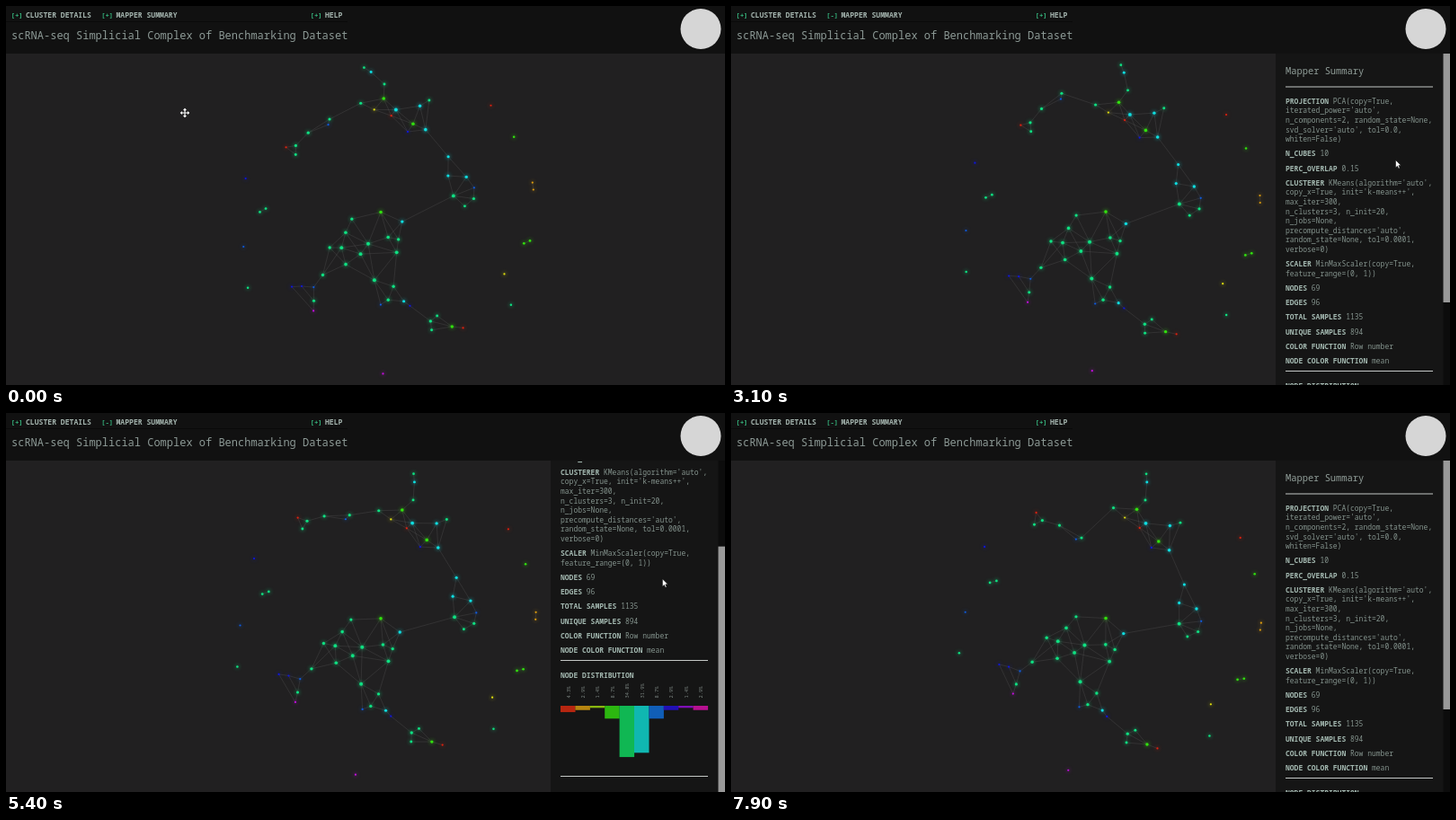
An HTML page for the animation above (8000 ms loop, 800 by 422 pixels).

```html
<!DOCTYPE html>
<html lang="en">
<head>
<meta charset="utf-8">
<title>Simplicial complex viewer</title>
<style>
  html, body { margin: 0; width: 100%; height: 100%; overflow: hidden; background: #212021; }
  svg { display: block; width: 100vw; height: 100vh; }
  text { font-family: 'Noto Sans Mono', 'DejaVu Sans Mono', monospace; white-space: pre; }
</style>
</head>
<body>
<svg viewBox="0 0 800 422">
  <defs>
    <filter id="glow" filterUnits="userSpaceOnUse" x="0" y="0" width="800" height="422" color-interpolation-filters="sRGB">
      <feGaussianBlur stdDeviation="2.2" result="halo"/>
      <feMerge><feMergeNode in="halo"/><feMergeNode in="SourceGraphic"/></feMerge>
    </filter>
  </defs>
  <rect width="800" height="422" fill="#212021"/>
  <path id="links" fill="none" stroke="#8c8c8c" stroke-opacity=".28" stroke-width=".6"/>
  <g id="dots" filter="url(#glow)"></g>
  <g id="panel">
    <rect x="606" y="53" width="194" height="369" fill="#151515"/>
    <g id="content"></g>
    <rect x="792.5" y="53" width="7.5" height="369" fill="#0c0c0c"/>
    <rect id="thumb" x="792.5" width="7.5" height="277" fill="#999"/>
  </g>
  <g id="header">
    <rect width="800" height="53" fill="#111"/>
    <rect y="17" width="380" height="1" fill="#0a0a0a"/>
    <circle cx="773" cy="25.5" r="22.5" fill="#d6d6d6"/>
  </g>
  <g id="cursor">
    <path id="arrow" d="M0 0V8.4L2 6.7 3.3 9.5 4.7 8.9 3.4 6.1H6Z" fill="#fff" stroke="#000" stroke-width=".5"/>
    <path id="move" d="M-4 0H4M0-4V4M-3-1.4L-4.5 0-3 1.4M3-1.4L4.5 0 3 1.4M-1.4-3L0-4.5 1.4-3M-1.4 3L0 4.5 1.4 3"
          fill="none" stroke="#fff" stroke-width="1.1"/>
  </g>
</svg>
<script>
const LOOP = 8000, STEP = 100;
const $ = id => document.getElementById(id);

function add(parent, tag, attrs, content) {
  const el = document.createElementNS('http://www.w3.org/2000/svg', tag);
  for (const name in attrs) el.setAttribute(name, attrs[name]);
  if (content !== undefined) el.textContent = content;
  parent.appendChild(el);
  return el;
}

const HUES = { red: 5, amber: 41, yellow: 60, lime: 110, green: 153, teal: 181, blue: 218, indigo: 238, violet: 292 };
const MAIN_COLORS = ['lime', 'green', 'teal'];

// Each cluster turns rigidly about its pivot; a pose is [time, dx, dy, degrees].
const turning = degrees => [[0, 0, 0, -degrees], [7900, 0, 0, degrees]];
const CLUSTERS = {
  core: {
    reach: 42, pivot: [420, 229], poses: turning(8.3),
    dots: {
      green: [[384, 232], [375, 246], [355, 260], [368, 262], [398, 262], [421, 258], [432, 262], [428, 276], [388, 272],
        [370, 281], [343, 289], [399, 303], [419, 313], [411, 327], [329, 316]],
      lime: [[417, 229]],
      teal: [[439, 243], [428, 331]],
      blue: [[402, 331], [331, 301]],
      indigo: [[434, 337], [318, 298], [307, 297]],
      violet: [[327, 327]]
    }
  },
  tail: {
    reach: 26, pivot: [432, 231], poses: turning(7.2), joins: 'core',
    dots: { green: [[457, 355], [457, 365], [465, 350]], lime: [[480, 364]], red: [[492, 367]] }
  },
  loop: {
    reach: 42, pivot: [410, 226], poses: turning(7.5), joins: 'core',
    dots: { teal: [[499, 179], [496, 200], [516, 204]], blue: [[523, 217]], green: [[521, 229], [499, 223], [510, 236]] }
  },
  arc: {
    reach: 42, pivot: [420, 228], joins: 'loop',
    poses: [[0, 0, -4, -7], [4000, 0, 0, 0], [7900, 0, -4, 8]],
    dots: {
      lime: [[435, 108], [464, 140]], teal: [[447, 122], [474, 121], [477, 148]], yellow: [[423, 119]],
      green: [[409, 110], [485, 116]], indigo: [[457, 148]], red: [[441, 128]]
    }
  },
  tip: {
    reach: 42, pivot: [446, 96], joins: 'arc',
    poses: [[0, -25, -9, -45], [2100, -10, -5, -22], [4000, 0, 0, 0], [6300, 11, 1, 9], [7900, 15, 1, 8]],
    dots: { green: [[443, 67], [446, 96]], teal: [[445, 76]] }
  },
  arm: {
    reach: 42, pivot: [375, 97], joins: 'arc',
    poses: [[0, -15, 29, -5], [2100, -14, 7, -15], [4000, 0, 0, 0], [6300, 11, 29, 41], [7900, 15, 42, 57]],
    dots: { green: [[375, 97], [350, 110], [335, 123], [334, 133]], blue: [[373, 103]], red: [[324, 124]] }
  },
  rim: {
    reach: 12, pivot: [443, 231], poses: turning(7.3),
    dots: {
      green: [[284, 209], [291, 206], [260, 291], [548, 347]], lime: [[571, 281], [578, 279], [575, 162]],
      indigo: [[273, 170]], blue: [[261, 245]], violet: [[397, 405]], yellow: [[545, 312]],
      amber: [[589, 215], [589, 223]], red: [[554, 124]]
    }
  }
};

// Smooth curve through [time, ...values] keys, for the value in the given column.
function spline(keys, column, t) {
  const last = keys.length - 1;
  if (t >= keys[last][0]) return keys[last][column];
  const i = keys.findIndex(k => k[0] > t) - 1;
  const slope = n => {
    const a = keys[Math.max(n - 1, 0)], b = keys[Math.min(n + 1, last)];
    return (b[column] - a[column]) / (b[0] - a[0]);
  };
  const a = keys[i], b = keys[i + 1];
  const span = b[0] - a[0], u = (t - a[0]) / span, w = 1 - u;
  return a[column] * (1 + 2 * u) * w * w + b[column] * u * u * (3 - 2 * u)
    + span * u * w * (slope(i) * w - slope(i + 1) * u);
}

const distance = (a, b) => Math.hypot(a.x - b.x, a.y - b.y);

// Two dots are linked when they are near and no third dot sits between them.
function linked(a, b, { nodes, reach }) {
  const gap = distance(a, b), middle = { x: (a.x + b.x) / 2, y: (a.y + b.y) / 2 };
  return gap < reach && nodes.every(n => n === a || n === b || distance(n, middle) > gap * .35);
}

function closestPair(first, second) {
  const pairs = first.flatMap(a => second.map(b => [a, b]));
  return pairs.reduce((best, pair) => distance(...pair) < distance(...best) ? pair : best);
}

const clusters = Object.values(CLUSTERS);
const edges = [];
for (const cluster of clusters) {
  cluster.nodes = Object.entries(cluster.dots).flatMap(([color, points]) =>
    points.map(([x, y]) => ({ x, y, color, degree: 0 })));
  cluster.nodes.forEach((a, i) => {
    for (const b of cluster.nodes.slice(i + 1)) if (linked(a, b, cluster)) edges.push([a, b]);
  });
  if (cluster.joins) edges.push(closestPair(cluster.nodes, CLUSTERS[cluster.joins].nodes));
}
for (const node of edges.flat()) node.degree++;
for (const node of clusters.flatMap(c => c.nodes)) {
  const r = MAIN_COLORS.includes(node.color) ? Math.min(2, 1.25 + node.degree * .11) : 1.1;
  node.el = add($('dots'), 'circle', { r, fill: `hsl(${HUES[node.color]} 88% 47%)` });
}

// Header
const header = $('header');
const menu = [[5.5, 'CLUSTER DETAILS'], [106, 'MAPPER SUMMARY'], [338.5, 'HELP']].map(([x, label]) => {
  const style = { y: 12.7, 'font-size': 8.1, 'font-weight': 700 };
  add(header, 'text', { ...style, x: x + 16.5, fill: '#a3b3ad' }, label);
  return add(header, 'text', { ...style, x, fill: '#35b37c', 'font-size': 7.4 }, '[+]');
});
add(header, 'text', { x: 6, y: 37, fill: '#8d9a96', 'font-size': 12, 'font-weight': 300 },
  'scRNA-seq Simplicial Complex of Benchmarking Dataset');

// Side panel
const content = $('content');
const LEFT = 617, WIDTH = 164;
const rule = y => add(content, 'rect', { x: LEFT, y, width: WIDTH, height: 1, fill: '#c4c8c6' });
const ENTRIES = [
  ['PROJECTION', 'PCA(copy=True,', "iterated_power='auto',", 'n_components=2, random_state=None,', "svd_solver='auto', tol=0.0,", 'whiten=False)'],
  ['N_CUBES', '10'],
  ['PERC_OVERLAP', '0.15'],
  ['CLUSTERER', "KMeans(algorithm='auto',", "copy_x=True, init='k-means++',", 'max_iter=300,', 'n_clusters=3, n_init=20,',
    'n_jobs=None,', "precompute_distances='auto',", 'random_state=None, tol=0.0001,', 'verbose=0)'],
  ['SCALER', 'MinMaxScaler(copy=True,', 'feature_range=(0, 1))'],
  ['NODES', '69'],
  ['EDGES', '96'],
  ['TOTAL SAMPLES', '1135'],
  ['UNIQUE SAMPLES', '894'],
  ['COLOR FUNCTION', 'Row number'],
  ['NODE COLOR FUNCTION', 'mean']
];
const labelText = { 'font-weight': 700, fill: '#a3b8b0' };
const bodyText = { x: LEFT, 'font-size': 8, fill: '#84938d' };
add(content, 'text', { x: LEFT, y: 75.5, 'font-size': 10.4, 'font-weight': 300, fill: '#919e99' }, 'Mapper Summary');
rule(89.5);
let baseline = 108.9;
for (const [label, first, ...rest] of ENTRIES) {
  const line = add(content, 'text', { ...bodyText, y: baseline });
  add(line, 'tspan', labelText, label);
  add(line, 'tspan', {}, ' ' + first);
  for (const extra of rest) add(content, 'text', { ...bodyText, y: baseline += 10.55 }, extra);
  baseline += 16.25;
}
rule(406);
add(content, 'text', { ...bodyText, ...labelText, y: 425.9 }, 'NODE DISTRIBUTION');
const SHARES = [4.3, 2.9, 1.4, 8.7, 34.8, 31.9, 8.7, 2.9, 1.4, 2.9];
SHARES.forEach((share, i) => {
  const step = WIDTH / SHARES.length, x = LEFT + i * step;
  add(content, 'rect', { x, y: 457, width: step + .1, height: share * 1.64, fill: `hsl(${8 + i * 34} 84% 39%)` });
  add(content, 'text', { transform: `translate(${x + 10.5} 448.5) rotate(-90)`, 'font-size': 5.4, fill: '#7d8783' },
    share.toFixed(1) + '%');
});
rule(535);

// Interaction
const OPEN_AT = 1500, CURSOR_GONE = 5500;
const CURSOR = [[0, 199, 119], [900, 42, 9], [1300, 112, 10], [1800, 147, 32],
  [2100, 732.5, 164.5], [3100, 739.5, 171.5], [4700, 740.3, 176], [5500, 729, 186]];
const WHEEL_TIME = 300;
const WHEEL = [[3300, 58], [4200, 57], [4700, 16], [6800, -58], [7150, -57], [7400, -16]];

function cursorAt(t) {
  const next = CURSOR.findIndex(k => k[0] > t);
  const [t0, x0, y0] = CURSOR[next - 1], [t1, x1, y1] = CURSOR[next];
  const u = (t - t0) / (t1 - t0);
  return [x0 + (x1 - x0) * u, y0 + (y1 - y0) * u];
}

function scrollAt(t) {
  return WHEEL.reduce((sum, [from, amount]) =>
    sum + amount * Math.min(1, Math.max(0, (t - from) / WHEEL_TIME)), 0);
}

function drawGraph(t) {
  for (const { nodes, pivot: [px, py], poses } of clusters) {
    const [dx, dy, degrees] = [1, 2, 3].map(column => spline(poses, column, t));
    const cos = Math.cos(degrees * Math.PI / 180), sin = Math.sin(degrees * Math.PI / 180);
    for (const node of nodes) {
      const x = node.x - px, y = node.y - py;
      node.at = [px + dx + x * cos - y * sin, py + dy + x * sin + y * cos];
      node.el.setAttribute('cx', node.at[0]);
      node.el.setAttribute('cy', node.at[1]);
    }
  }
  $('links').setAttribute('d', edges.map(([a, b]) => `M${a.at}L${b.at}`).join(''));
}

function drawInterface(t) {
  const show = (id, visible) => $(id).setAttribute('display', visible ? 'inline' : 'none');
  const open = t >= OPEN_AT;
  menu[1].textContent = open ? '[-]' : '[+]';
  show('panel', open);
  const scroll = scrollAt(t);
  content.setAttribute('transform', `translate(0 ${-scroll})`);
  $('thumb').setAttribute('y', 53 + scroll * .73);

  const hasCursor = t < CURSOR_GONE;
  show('cursor', hasCursor);
  if (!hasCursor) return;
  const [x, y] = cursorAt(t);
  const overGraph = y > 53 && !(open && x > 606);
  $('cursor').setAttribute('transform', `translate(${x} ${y})`);
  show('move', overGraph);
  show('arrow', !overGraph);
}

const start = performance.now();
function tick() {
  const elapsed = Math.max(0, performance.now() - start) % LOOP;
  const t = Math.floor(elapsed / STEP) * STEP;
  drawGraph(t);
  drawInterface(t);
  requestAnimationFrame(tick);
}
tick();
</script>
</body>
</html>
```
